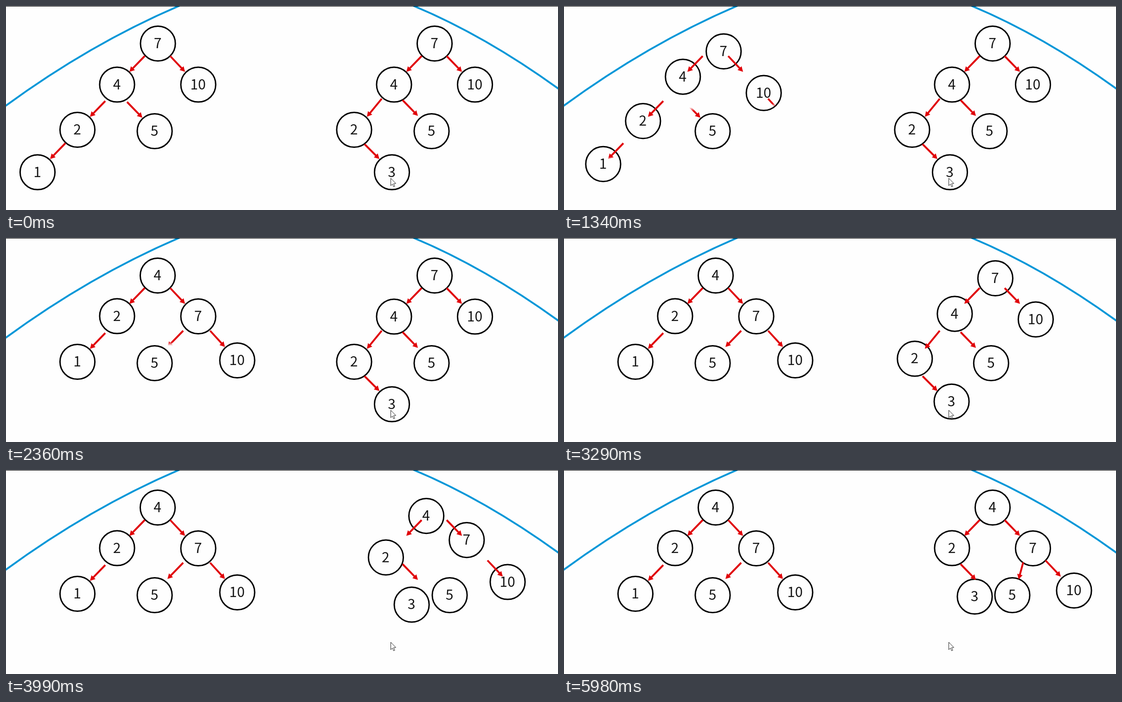
These frames come from a looping animation (1190x440 px, 6020 ms). An HTML page with a canvas:

```html
<!DOCTYPE html>
<html lang="en">
<head>
<meta charset="utf-8">
<title>Tree rotation</title>
<style>
  html, body { margin: 0; width: 100%; height: 100%; overflow: hidden; background: #fefefe; }
  canvas { display: block; width: 1190px; height: 440px; }
</style>
</head>
<body>
<canvas id="stage" width="1190" height="440"></canvas>
<script>
const ctx = document.getElementById('stage').getContext('2d');
const LOOP = 6020, MOVE = 1310, WIPE = 375, SOFT = 8;
const RED = '224,2,8';

// Each tree: motion start, nodes [label, x0, y0, x1, y1],
// arrows {p: [tail x, tail y, tip x, tip y], show/hide: wipe start, keep: side that stays visible}
const trees = [
  {
    start: 963,
    nodes: [
      ['7', 327.5, 81, 414.5, 169],
      ['4', 239.5, 169.5, 327, 81],
      ['10', 414.5, 169.5, 498.5, 264],
      ['2', 154, 267, 239.5, 168.5],
      ['5', 320.5, 270, 320.5, 270],
      ['1', 68, 358.5, 154, 267]
    ],
    arrows: [
      { p: [299, 108, 266, 142] },
      { p: [354, 108, 386, 142] },
      { p: [214, 205, 181, 239] },
      { p: [261, 207, 294, 241], hide: 1160, keep: 'bottom' },
      { p: [128, 296, 95, 330], hide: 1285, keep: 'top' },
      { p: [440, 200, 472, 235], show: 1180, keep: 'top' },
      { p: [382, 200, 348, 235], show: 2085, keep: 'top' }
    ]
  },
  {
    start: 3072,
    nodes: [
      ['7', 924, 81, 1011, 169],
      ['4', 836.5, 169.5, 924, 81],
      ['10', 1011, 169.5, 1099.5, 260],
      ['2', 750.5, 267, 836.5, 168.5],
      ['5', 917.5, 270, 966.5, 270],
      ['3', 832, 358.5, 885.5, 273]
    ],
    arrows: [
      { p: [896, 108, 863, 142] },
      { p: [950, 108, 983, 142] },
      { p: [855, 203, 888, 237] },
      { p: [810, 200, 778, 239], hide: 3325, keep: 'top' },
      { p: [773, 298, 805, 330], hide: 3280, keep: 'bottom' },
      { p: [1038, 195, 1071, 230], show: 3280, keep: 'top' },
      { p: [990, 199, 980, 236], show: 4190, keep: 'top' }
    ]
  }
];

const clamp = v => Math.min(1, Math.max(0, v));
const lerp = (a, b, k) => a + (b - a) * k;
const ease = k => (1 - Math.cos(Math.PI * clamp(k))) / 2;

function drawNode([label, x0, y0, x1, y1], k) {
  const x = lerp(x0, x1, k), y = lerp(y0, y1, k);
  ctx.beginPath();
  ctx.arc(x, y, 37.6, 0, Math.PI * 2);
  ctx.fillStyle = '#fefefe';
  ctx.fill();
  ctx.strokeStyle = '#000';
  ctx.lineWidth = 3;
  ctx.stroke();
  ctx.fillStyle = '#151515';
  ctx.fillText(label, x - 0.5, y + 10);
}

// A vertical wipe with a soft edge, expressed as a gradient.
function wipePaint(arrow, t) {
  const { p, show, hide, keep } = arrow;
  if (show === undefined && hide === undefined) return `rgb(${RED})`;
  const shown = show !== undefined ? clamp((t - show) / WIPE) : 1 - clamp((t - hide) / WIPE);
  if (shown === 0) return null;
  if (shown === 1) return `rgb(${RED})`;
  const top = p[1] - 3, bottom = p[3] + 2;
  const down = keep === 'top';
  const edge = down ? lerp(top, bottom + SOFT, shown) : lerp(bottom, top - SOFT, shown);
  const paint = ctx.createLinearGradient(0, edge + (down ? -SOFT : SOFT), 0, edge);
  paint.addColorStop(0, `rgba(${RED},1)`);
  paint.addColorStop(1, `rgba(${RED},0)`);
  return paint;
}

function drawArrow(arrow, t) {
  const paint = wipePaint(arrow, t);
  if (!paint) return;
  const [x0, y0, x1, y1] = arrow.p;
  const len = Math.hypot(x1 - x0, y1 - y0);
  const ux = (x1 - x0) / len, uy = (y1 - y0) / len;
  const at = (along, side) => [x0 + ux * along - uy * side, y0 + uy * along + ux * side];
  const neck = len - 11;
  ctx.beginPath();
  [at(0, -2), at(neck, -2), at(neck, -6), at(len, 0), at(neck, 6), at(neck, 2), at(0, 2)]
    .forEach(q => ctx.lineTo(...q));
  ctx.closePath();
  ctx.fillStyle = paint;
  ctx.fill();
}

function drawBackdrop() {
  ctx.fillStyle = '#fefefe';
  ctx.fillRect(0, 0, 1190, 440);
  ctx.strokeStyle = '#0797d8';
  ctx.lineWidth = 4;
  ctx.beginPath();
  ctx.moveTo(-3, 217);
  ctx.quadraticCurveTo(181, 82, 375, -1);
  ctx.moveTo(877, -1);
  ctx.quadraticCurveTo(1033, 64, 1193, 180);
  ctx.stroke();
  ctx.fillStyle = '#000';
  ctx.fillRect(0, 0, 1190, 1);
}

function drawPointer() {
  const outline = [[0, 0], [0, 16], [3.6, 12.6], [6.2, 18.4], [8.6, 17.3], [6.1, 11.6], [11, 11.4]];
  ctx.beginPath();
  outline.forEach(([x, y]) => ctx.lineTo(829.5 + x, 371.5 + y));
  ctx.closePath();
  ctx.fillStyle = '#fff';
  ctx.fill();
  ctx.strokeStyle = '#222';
  ctx.lineWidth = 1;
  ctx.stroke();
}

function draw(t) {
  drawBackdrop();
  ctx.font = '30px "Noto Sans CJK SC", "Noto Sans CJK JP", "Noto Sans", sans-serif';
  ctx.textAlign = 'center';
  for (const { start, nodes, arrows } of trees) {
    const k = ease((t - start) / MOVE);
    nodes.forEach(n => drawNode(n, k));
    arrows.forEach(a => drawArrow(a, t));
  }
  drawPointer();
}

const begin = performance.now();
function tick() {
  draw((performance.now() - begin) % LOOP);
  requestAnimationFrame(tick);
}
tick();
</script>
</body>
</html>
```
